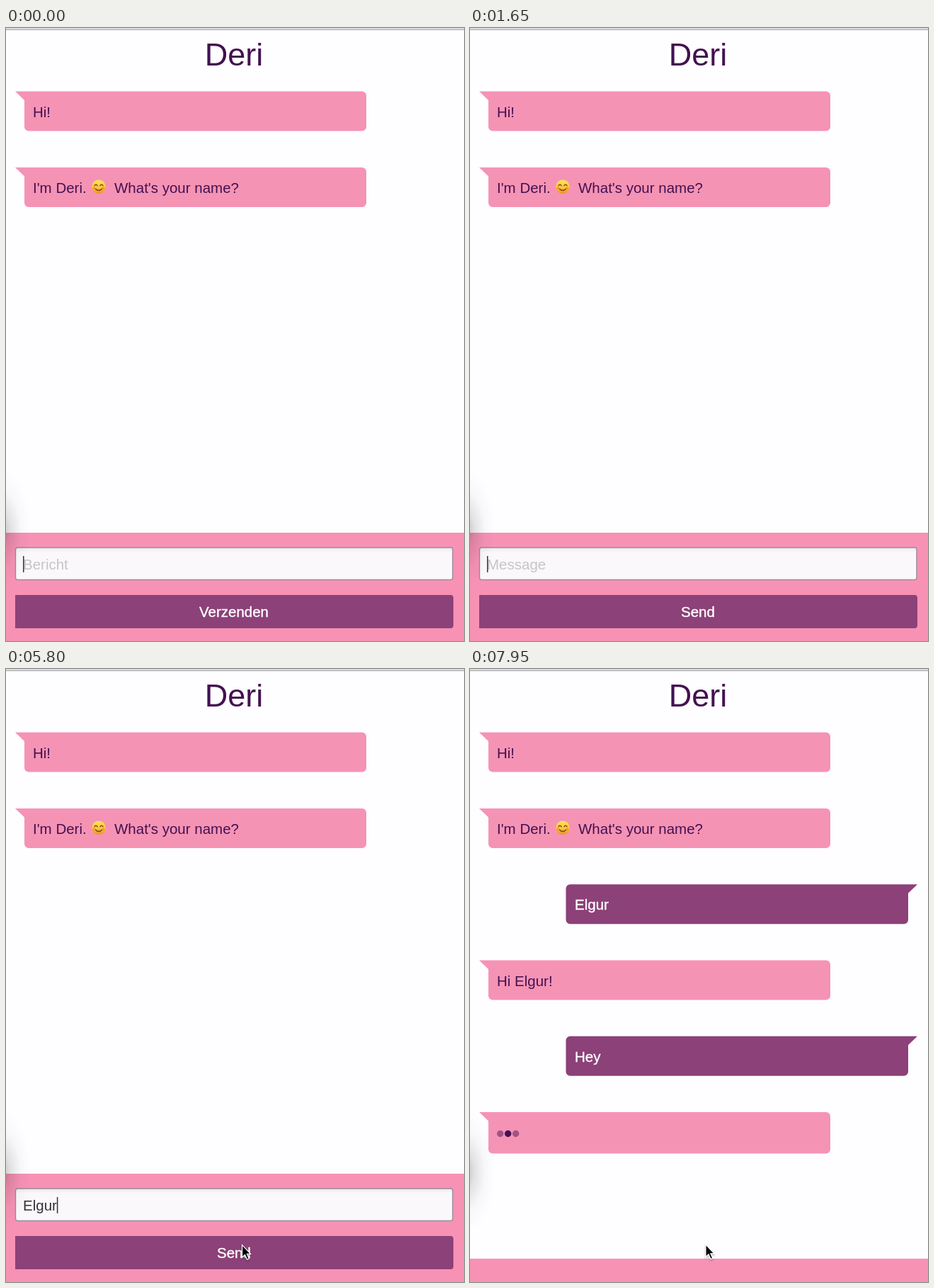
An HTML page for the animation above (8 s loop, 647 by 866 pixels).

```html
<!DOCTYPE html>
<html lang="en">
<head>
<meta charset="utf-8">
<title>Chat</title>
<style>
  html, body { margin: 0; height: 100%; overflow: hidden; background: #fefdff; }
  svg { display: block; width: 100vw; height: 100vh; }
  text { font: 20.5px "Liberation Sans", Arial, sans-serif; white-space: pre; fill: #431150; }
  .title { font-size: 45px; text-anchor: middle; }
  .white { fill: #fff; stroke: #fff; stroke-width: .4; }
  .button { text-anchor: middle; }
  .hint { fill: #c7c4c9; }
  .typed { fill: #343138; }
</style>
</head>
<body>
<svg viewBox="0 0 647 866">
  <defs>
    <radialGradient id="shade">
      <stop offset="0" stop-color="#000" stop-opacity=".24"/>
      <stop offset=".3" stop-color="#000" stop-opacity=".11"/>
      <stop offset=".65" stop-color="#000" stop-opacity=".025"/>
      <stop offset="1" stop-color="#000" stop-opacity="0"/>
    </radialGradient>
    <linearGradient id="face" x2="0" y2="1">
      <stop offset="0" stop-color="#ffe45c"/>
      <stop offset=".55" stop-color="#fcc63c"/>
      <stop offset="1" stop-color="#ee8f24"/>
    </linearGradient>
    <linearGradient id="field" x2="0" y2="1">
      <stop offset="0" stop-color="#ebe8ed"/>
      <stop offset=".14" stop-color="#faf8fb"/>
    </linearGradient>
    <filter id="drop" x="-50%" y="-50%" width="200%" height="200%">
      <feDropShadow dx="0" dy="1.5" stdDeviation="1.2" flood-opacity=".35"/>
    </filter>
    <g id="smile">
      <circle r="9.8" fill="url(#face)"/>
      <g fill="none" stroke="#7a4310" stroke-width="1.4" stroke-linecap="round">
        <path d="M-6-1.5q2-3 4 0M2-1.5q2-3 4 0M-4.5 3q4.5 4.5 9 0"/>
      </g>
      <g fill="#f47f45" opacity=".6"><circle cx="-6.5" cy="2" r="2"/><circle cx="6.5" cy="2" r="2"/></g>
    </g>
  </defs>
  <rect width="647" height="866" fill="#fefdff"/>
  <rect width="647" height="2" fill="#dddbdf"/>
  <rect y="2" width="647" height="1" fill="#a9a7ab"/>
  <text class="title" x="322" y="53">Deri</text>
  <g id="scene"></g>
  <ellipse cx="-6" cy="710" rx="42" ry="86" fill="url(#shade)"/>
  <path id="pointer" d="M0 0V17.5L4 13.8L7 20.6L9.8 19.4L6.9 12.8H12Z" fill="#000" stroke="#fff" stroke-width="1.2" filter="url(#drop)"/>
</svg>
<script>
const LOOP = 8000, BLINK = 500;
const RELOAD = 450, FOCUS = 1350, SEND_NAME = 6100, REOPEN = 6950, SEND_HEY = 7600;
const scene = document.getElementById('scene');
const pointer = document.getElementById('pointer');
const clamp = v => Math.max(0, Math.min(1, v));
const rowTop = row => 89.6 + 107.3 * row;
const label = (x, y, text, cls = '') => `<text x="${x}" y="${y}" class="${cls}">${text}</text>`;

function botBubble(row, content, height = 56) {
  const top = rowTop(row);
  return `<g transform="translate(0 ${top})">
    <path fill="#f593b5" d="M13 0H503a6 6 0 0 1 6 6V${height - 6}a6 6 0 0 1-6 6H32a6 6 0 0 1-6-6V12.5Z"/>${content}</g>`;
}

function userBubble(row, text, opacity = 1) {
  return `<g transform="translate(0 ${rowTop(row)})" opacity="${opacity}">
    <path fill="#8c4178" d="M632 0H141.500a6 6 0 0 0-6 6V50a6 6 0 0 0 6 6H613a6 6 0 0 0 6-6V12.500Z"/>
    ${label(148, 36, text, 'white')}</g>`;
}

function typing(row, elapsed) {
  const active = Math.floor(elapsed / 300) % 3;
  const dots = [0, 1, 2].map(i =>
    `<circle cx="${42.7 + 11 * i}" cy="30.4" r="4.7" fill="${i === active ? '#431150' : '#a05389'}"/>`);
  return botBubble(row, dots.join(''), 58.5);
}

const hello = () => botBubble(0, label(38, 36, 'Hi!'));
const question = () => botBubble(1, label(38, 36, "I'm Deri.") +
  '<use href="#smile" x="131" y="27.300"/>' + label(153, 36, "What's your name?"));

// Each bot line shows dots first, then its text.
function messages(t) {
  if (t >= RELOAD && t < 700) return '';
  if (t >= 700 && t < 950) return typing(0, t - 700);
  if (t >= 950 && t < 1300) return hello() + typing(1, t - 950);
  let out = hello() + question();
  if (t >= SEND_NAME) {
    out += userBubble(2, 'Elgur', clamp((t - 6250) / 200));
    out += t < 6850 ? typing(3, t - SEND_NAME) : botBubble(3, label(38, 36, 'Hi Elgur!'));
  }
  if (t >= SEND_HEY) out += userBubble(4, 'Hey') + typing(5, t - SEND_HEY);
  return out;
}

function typed(t) {
  const [word, start, step] = t < SEND_NAME ? ['Elgur', 3350, 300] : ['Hey', 7200, 100];
  const count = Math.max(0, Math.min(word.length, Math.floor((t - start) / step) + 1));
  const lastKey = count ? start + (count - 1) * step : t < RELOAD ? 0 : t < SEND_NAME ? FOCUS : REOPEN;
  return { text: word.slice(0, count), caret: Math.floor((t - lastKey) / BLINK) % 2 === 0 };
}

function footer(t) {
  const closedTop =
    t >= RELOAD && t < FOCUS ? 812 :
    t >= SEND_NAME && t < REOPEN ? 853 :
    t >= SEND_HEY ? 833 : 0;
  const top = closedTop || 713;
  const bar = `<rect y="${top}" width="647" height="${866 - top}" fill="#f792b5"/>`;
  if (closedTop) return bar;
  const dutch = t < RELOAD;
  const { text, caret } = typed(t);
  return bar +
    `<rect x="13.500" y="734" width="617.500" height="45.500" rx="3" fill="url(#field)" stroke="#9b8c96" stroke-width="1.400"/>` +
    (text ? label(24, 765, text, 'typed') : label(24, 765, dutch ? 'Bericht' : 'Message', 'hint')) +
    (caret ? '<rect id="caret" x="24" y="746" width="1.500" height="23" fill="#343138"/>' : '') +
    `<path fill="#8c4178" d="M13 801H628a4 4 0 0 1 4 4V844a4 4 0 0 1-4 4H13Z"/>` +
    label(322, 832, dutch ? 'Verzenden' : 'Send', 'white button');
}

function movePointer(t) {
  const resting = t >= 2200 && t < 3350;
  const p = clamp((t - 5550) / 350), ease = 1 - (1 - p) ** 3;
  const x = resting ? 404 : 358 - 25 * ease;
  const y = resting ? 402 : 842 - 29 * ease;
  pointer.setAttribute('transform', `translate(${x} ${y})`);
  pointer.style.display = resting || t >= 5550 ? '' : 'none';
}

let shown = '';
function draw() {
  const t = performance.now() % LOOP;
  const markup = messages(t) + footer(t);
  if (markup !== shown) {
    scene.innerHTML = shown = markup;
    const caret = document.getElementById('caret'), text = scene.querySelector('.typed');
    if (caret && text) caret.setAttribute('x', 24 + text.getComputedTextLength());
  }
  movePointer(t);
  requestAnimationFrame(draw);
}
draw();
</script>
</body>
</html>
```
